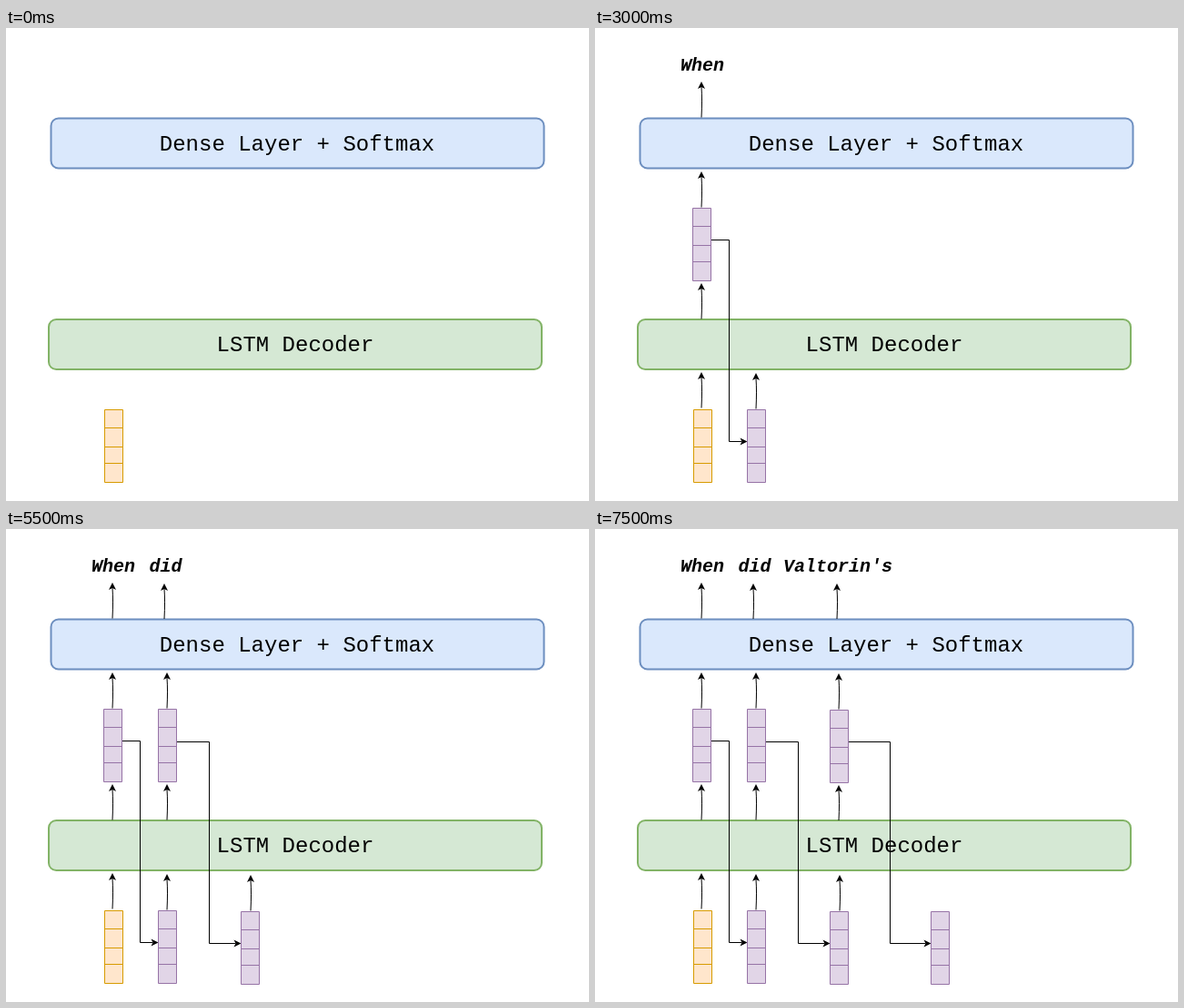
An HTML page for the animation above (8000 ms loop, 641 by 521 pixels).

```html
<!DOCTYPE html>
<html lang="en">
<head>
<meta charset="utf-8">
<title>LSTM decoder</title>
<style>
  html, body { margin: 0; width: 100%; height: 100%; overflow: hidden; background: #fff; }
  svg { display: block; }
  text { font: 24px "Courier New", "Liberation Mono", monospace; text-anchor: middle; }
  .word { font-size: 20px; font-weight: bold; font-style: italic; }
  .wire { fill: none; stroke: #000; }
  .orange { fill: #ffe6cc; stroke: #d79b00; }
  .purple { fill: #e1d5e7; stroke: #9673a6; }
</style>
</head>
<body>
<svg id="stage" width="641" height="521" viewBox="0 0 641 521">
  <rect x="49.5" y="99.5" width="542" height="55" rx="8.25" fill="#dae8fc" stroke="#6c8ebf" stroke-width="2"/>
  <text x="320" y="135">Dense Layer + Softmax</text>
  <rect x="47" y="321" width="542" height="55" rx="8.25" fill="#d5e8d4" stroke="#82b366" stroke-width="2"/>
  <text x="318" y="356">LSTM Decoder</text>
</svg>
<script>
const STEP = 500, LOOP = 8000;

const vector = (x, y, color = "purple") =>
  `<path class="${color}" d="M${x} ${y}h20v80h-20z` +
  [20, 41, 59].map(d => `M${x} ${y + d}h20`).join("") + `"/>`;

const head = (x, y, angle) =>
  `<path transform="translate(${x} ${y}) rotate(${angle})" d="M0 0L4 8L0 6L-4 8Z"/>`;

// Upward arrow with a slight bend
const arrow = (x, from, to) =>
  `<path class="wire" d="M${x} ${from}Q${x + 1} ${from - 20} ${x} ${to + 6}"/>` + head(x, to, 0);

const elbow = (x, y, mid, end) =>
  `<path class="wire" d="M${x} ${y}H${mid}V${y + 222}H${end - 6}"/>` + head(end, y + 222, 90);

const word = (x, text) => `<text class="word" x="${x}" y="47">${text}</text>`;

const steps = [
  vector(108.5, 420.5, "orange"),
  arrow(117, 418.5, 379),
  arrow(117, 320.5, 281) + vector(107.5, 198.5),
  arrow(117, 197.5, 158),
  arrow(117, 98.5, 59) + word(118, "When"),

  elbow(128, 233.5, 147.5, 167.5) + vector(167.5, 420.5),
  arrow(177, 419.5, 380),
  arrow(177, 320.5, 281) + vector(167.5, 198.5),
  arrow(177, 197.5, 158),
  arrow(174, 99, 60) + word(175.5, "did"),

  elbow(188, 234.5, 223.5, 258.5) + vector(258.5, 421.5),
  arrow(269, 420.5, 381),
  arrow(268, 321, 282) + vector(258.5, 199.5),
  arrow(268, 198.5, 159),
  arrow(266, 99, 60) + word(267, "Valtorin's"),

  elbow(279, 234.5, 324.5, 369.5) + vector(369.5, 421.5),
];

const stage = document.getElementById("stage");
stage.insertAdjacentHTML("beforeend", steps.map(s => `<g class="step">${s}</g>`).join(""));
const groups = [...stage.querySelectorAll(".step")];

function draw() {
  const current = Math.floor(performance.now() % LOOP / STEP);
  groups.forEach((g, i) => g.style.display = i <= current ? "" : "none");
  requestAnimationFrame(draw);
}
draw();
</script>
</body>
</html>
```
